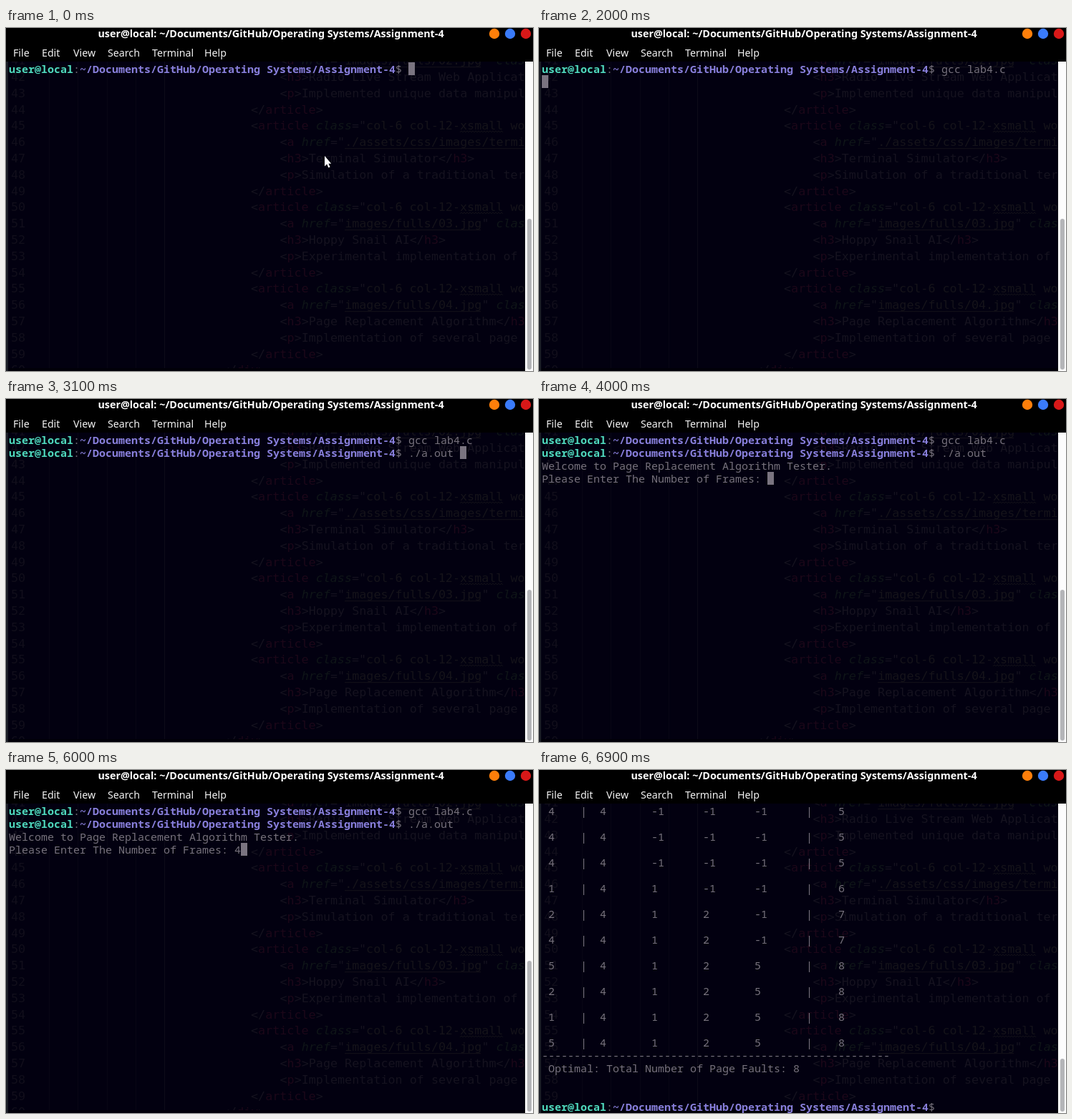
An HTML page with a canvas for the animation above (8 s loop, 736 by 480 pixels).

```html
<!DOCTYPE html>
<html lang="en">
<head>
<meta charset="utf-8">
<title>Terminal session</title>
<style>
  html, body { margin: 0; width: 100%; height: 100%; overflow: hidden; background: #000; }
  canvas { display: block; }
</style>
</head>
<body>
<canvas id="stage" width="736" height="480"></canvas>
<script>
const ctx = document.getElementById('stage').getContext('2d');
const LOOP = 8000;
const USER = 'user@local';
const PATH = '~/Documents/GitHub/Operating Systems/Assignment-4';
const PROMPT = `${USER}:${PATH}$ `;
const CELL = 9, ROW = 18, LEFT = 4, TOP = 48;
const TEXT = '#77727c', TEAL = '#4fd9bd', PURPLE = '#887fdb';
const MONO = '15px "Noto Sans Mono", monospace';
const CODE = '16.73px "DejaVu Sans Mono", monospace';
const CODE_CHAR = 10.07, CODE_ROW = 22.8;
const FAINT = '#15121f', TAG = '#1c0719', ATTR = '#0f1518', STRING = '#15131a';

function box(color, x, y, w, h) {
  ctx.fillStyle = color;
  ctx.fillRect(x, y, w, h);
}

function write(str, x, y, color, font) {
  ctx.font = font;
  ctx.fillStyle = color;
  ctx.fillText(str, x, y);
}

// Editor showing faintly through the terminal: lines of [text, color, decoration]
const open = name => [['<', FAINT], [name, TAG], ['>', FAINT]];
const close = name => [['</', FAINT], [name, TAG], ['>', FAINT]];
const article = [['<', FAINT], ['article ', TAG], ['class', ATTR, 'italic'], ['="', FAINT],
  ['col-6 col-12-', STRING], ['xsmall', STRING, 'wave'], [' work-item">', STRING]];
const link = path => [['<', FAINT], ['a ', TAG], ['href', ATTR, 'italic'], ['="', FAINT],
  [path, STRING, 'underline'], ['" ', FAINT], ['class', ATTR, 'italic']];
const heading = title => [...open('h3'), [title, FAINT], ...close('h3')];
const paragraph = str => [...open('p'), [str, FAINT]];
const entry = (path, title, str) =>
  [article, link(path), heading(title), paragraph(str), close('article')];

const editor = [
  ...entry('images/fulls/02.jpg', 'Radio Live Stream Web Application', 'Implemented unique data manipulation'),
  ...entry('./assets/css/images/terminal.jpg', 'Terminal Simulator', 'Simulation of a traditional terminal'),
  ...entry('images/fulls/03.jpg', 'Hoppy Snail AI', 'Experimental implementation of'),
  ...entry('images/fulls/04.jpg', 'Page Replacement Algorithm', 'Implementation of several page'),
  close('div')
];

function decorate(kind, x, y, width, color) {
  ctx.strokeStyle = color;
  ctx.lineWidth = 1;
  ctx.beginPath();
  for (let i = 0; i <= width; i += 2) {
    const lift = kind === 'wave' ? (i / 2 % 2) * 2 : 0;
    ctx.lineTo(x + i, y + 3.5 - lift);
  }
  ctx.stroke();
}

function drawEditor() {
  for (let i = 0; i < 5; i++) box(i === 4 ? '#0e0c18' : '#080615', 60 + Math.round(i * 40.3), 47, 1, 429);
  editor.forEach((line, i) => {
    const number = 40 + i;
    const y = 74 + (number - 42) * CODE_ROW;
    write(String(number), 7, y, '#110e1b', CODE);
    const isDiv = line[1][0] === 'div';
    const isArticle = line[1][0].startsWith('article');
    let x = isDiv ? 302 : isArticle ? 342 : 382.5;
    for (const [str, color, look] of line) {
      write(str, x, y, color, (look === 'italic' ? 'italic ' : '') + CODE);
      const width = str.length * CODE_CHAR;
      if (look === 'wave' || look === 'underline') decorate(look, x, y, width, color);
      x += width;
    }
  });
}

// Terminal content as a function of time
const firstCommand = [[0, ''], [500, 'g'], [600, 'gc'], [700, 'gcc'], [800, 'gcc '],
  [900, 'gcc l'], [1100, 'gcc la'], [1500, 'gcc lab4.c ']];
const secondCommand = [[0, ''], [2800, './'], [2900, './a'], [3100, './a.out ']];
const cursorOff = [[1900, 2000], [4300, 4900], [6900, LOOP]];
const latest = (keys, t) => keys.filter(([at]) => at <= t).pop()[1];

const pageRow = ([page, a, b, c, d, faults]) =>
  ` ${page}    |  ${[a, b, c, d].map(v => String(v).padEnd(8)).join('')}|    ${faults}`;
const table = [
  [4, 4, -1, -1, -1, 5], [4, 4, -1, -1, -1, 5], [4, 4, -1, -1, -1, 5],
  [1, 4, 1, -1, -1, 6], [2, 4, 1, 2, -1, 7], [4, 4, 1, 2, -1, 7],
  [5, 4, 1, 2, 5, 8], [2, 4, 1, 2, 5, 8], [1, 4, 1, 2, 5, 8], [5, 4, 1, 2, 5, 8]
];
const results = [
  ...table.flatMap(row => [pageRow(row), '']).slice(0, -1),
  '-'.repeat(54),
  ' Optimal: Total Number of Page Faults: 8', '', '', PROMPT
];

function screenAt(t) {
  if (t >= 6500) return results;
  const lines = [PROMPT + latest(firstCommand, t)];
  if (t >= 1800) lines.push(t < 2500 ? '' : PROMPT + latest(secondCommand, t));
  if (t >= 4000) {
    lines.push('Welcome to Page Replacement Algorithm Tester.',
      'Please Enter The Number of Frames: ' + (t >= 6000 ? '4' : ''));
  }
  return lines;
}

function drawLine(line, row) {
  const y = TOP + row * ROW + 15;
  const at = col => LEFT + col * CELL;
  if (!line.startsWith(PROMPT)) return write(line, LEFT, y, TEXT, MONO);
  const pathCol = USER.length + 1;
  const endCol = pathCol + PATH.length;
  write(USER, LEFT, y, TEAL, 'bold ' + MONO);
  write(':', at(USER.length), y, TEXT, MONO);
  write(PATH, at(pathCol), y, PURPLE, 'bold ' + MONO);
  write(line.slice(endCol), at(endCol), y, TEXT, MONO);
}

function drawTerminal(t) {
  const lines = screenAt(t);
  lines.forEach(drawLine);
  if (cursorOff.some(([from, to]) => t >= from && t < to)) return;
  const row = lines.length - 1;
  box('#7a7480', LEFT + lines[row].length * CELL, TOP + row * ROW, CELL, ROW);
}

function drawScrollbar(top) {
  box('#fcfcfc', 725, 47, 11, 433);
  ctx.fillStyle = '#b4b5b8';
  ctx.beginPath();
  ctx.roundRect(728, top, 6, 478 - top, 3);
  ctx.fill();
}

function drawHeader() {
  box('#000', 0, 0, 736, 47);
  ctx.textAlign = 'center';
  write(`${USER}: ${PATH}`, 370, 13, '#fff', 'bold 14.33px "Noto Sans", sans-serif');
  ctx.textAlign = 'left';
  const menu = { File: 10, Edit: 50, View: 94, Search: 142, Terminal: 204, Help: 277 };
  for (const name in menu) write(name, menu[name], 40, '#f2f2f2', '14.2px "Noto Sans", sans-serif');
  ['#ff7f0a', '#3a7bfa', '#d81818'].forEach((color, i) => {
    ctx.fillStyle = color;
    ctx.beginPath();
    ctx.arc(682 + i * 22, 8, 7.2, 0, 7);
    ctx.fill();
  });
}

function drawPointer() {
  ctx.fillStyle = '#fff';
  ctx.fill(new Path2D('M445 179V193.5L448.2 190.6L450.4 195.6L452.6 194.6L450.4 189.8H454.2Z'));
}

function draw(t) {
  box('#020010', 0, 0, 736, 480);
  drawEditor();
  box('#010008', 0, 476, 725, 4);
  box('#1a1d25', 0, 47, 3, 433);
  drawTerminal(t);
  drawScrollbar(t < 6500 ? 267 : 404);
  drawHeader();
  if (t < 300) drawPointer();
}

const start = performance.now();
function tick() {
  draw((performance.now() - start) % LOOP);
  requestAnimationFrame(tick);
}
tick();
</script>
</body>
</html>
```
